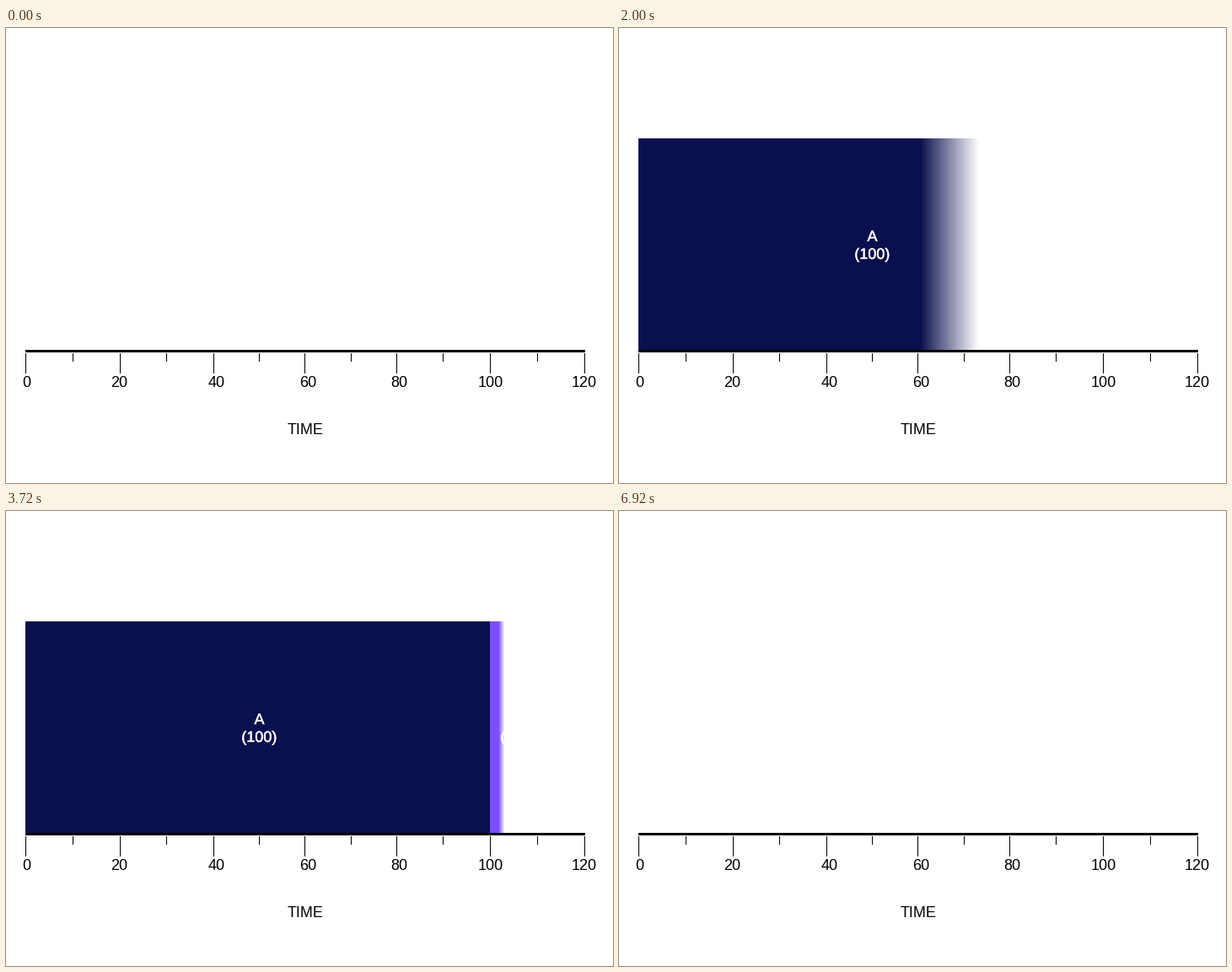
These frames come from a looping animation (720 by 540 pixels, 6.96 s). A matplotlib script:

```python
import numpy as np
import matplotlib.pyplot as plt
from matplotlib import patheffects
from matplotlib.animation import FuncAnimation
from matplotlib.colors import to_rgb
from matplotlib.patches import Rectangle

WIDTH, HEIGHT, DPI = 720, 540, 72
STEP, LOOP, CLEAR_AT = 40, 6960, 6920
TOP, BASE = 131, 382
FONT_SIZE = 18

fig = plt.figure(figsize=(WIDTH / DPI, HEIGHT / DPI), dpi=DPI, facecolor="white")
ax = fig.add_axes([0, 0, 1, 1])
ax.axis("off")


def bar(x, y, w, h):
    ax.add_patch(Rectangle((x, y), w, h, fc="black", lw=0, antialiased=False, zorder=4))


def label(x, y, text, color="black", **kwargs):
    return ax.text(x, y, text, color=color, family="Liberation Sans", size=FONT_SIZE,
                   ha="center", va="baseline", zorder=5, **kwargs)


class Block:
    """A coloured bar revealed from left to right by a soft-edged wipe."""

    def __init__(self, left, right, color, start, duration, name, cost, center):
        self.left, self.width = left, right - left
        self.start, self.duration = start, duration
        self.feather = self.width / 8
        self.x = np.arange(left, right) + 0.5
        self.pixels = np.zeros((1, self.width, 4))
        self.pixels[..., :3] = to_rgb(color)
        self.image = ax.imshow(self.pixels, extent=(left, right, BASE, TOP),
                               aspect="auto", interpolation="nearest", zorder=2)
        # White captions stay hidden against the white page until the wipe passes.
        bold = [patheffects.withStroke(linewidth=0.4, foreground="white")]
        label(center, 253, name, "white", path_effects=bold)
        label(center, 274, f"({cost})", "white", path_effects=bold)

    def update(self, t):
        progress = np.clip((t - self.start) / self.duration, 0, 1)
        lead = self.left + progress * (self.width + self.feather)
        self.pixels[0, :, 3] = np.clip((lead - self.x) / self.feather, 0, 1)
        self.image.set_data(self.pixels)


blocks = [
    Block(23, 578, "#0a0f4d", 800, 1855, "A", 100, 300.5),
    Block(574, 631, "#7c4dff", 3480, 880, "B", 10, 602.5),
    Block(630, 687, "#059eaa", 5200, 915, "C", 10, 658.5),
]

bar(23, BASE, 664, 3)
for x in (23, 135, 246, 354, 463, 574, 686):
    bar(x, 386, 1, 24)
for x in (79, 190, 300, 409, 518, 630):
    bar(x, 386, 1, 10)
for i, x in enumerate((24, 134.5, 249.5, 358, 466, 574.5, 685.5)):
    label(x, 426.5, str(20 * i))
label(355, 482, "TIME")

ax.set_xlim(0, WIDTH)
ax.set_ylim(HEIGHT, 0)


def draw(frame):
    t = frame * STEP
    for block in blocks:
        block.update(t if t < CLEAR_AT else 0)
    return [block.image for block in blocks]


anim = FuncAnimation(fig, draw, frames=LOOP // STEP, interval=STEP,
                     repeat=True, repeat_delay=0, blit=False)
plt.show()
```
